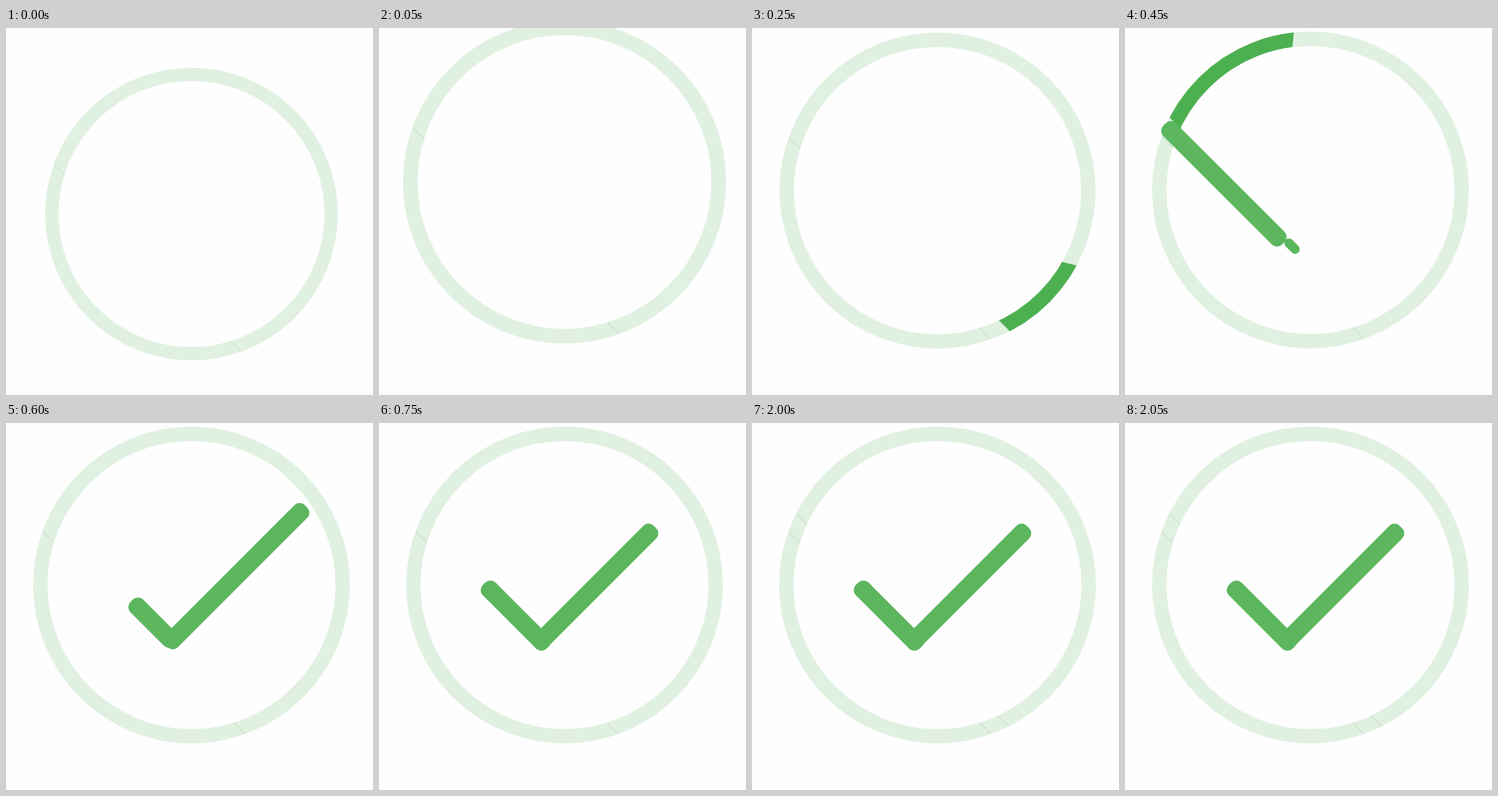
Recreate the animation shown at these times as an HTML page with a canvas. Size 367 px wide and 367 px high, loop 2450 ms.

```html
<!DOCTYPE html>
<html lang="en">
<head>
<meta charset="utf-8">
<title>Success</title>
<style>
  html, body { margin: 0; width: 100%; height: 100%; overflow: hidden; background: #fefefe; }
  canvas { display: block; width: 367px; height: 367px; }
</style>
</head>
<body>
<canvas id="stage" width="367" height="367"></canvas>
<script>
const ctx = document.getElementById('stage').getContext('2d');
const LOOP = 2450, STEP = 50, UNIT = 3.6, QUARTER = Math.PI / 4;

// Cubic Bezier easing, solved for x by bisection
const bezier = (x1, y1, x2, y2) => x => {
  const at = (s, a, b) => 3 * s * (1 - s) ** 2 * a + 3 * s * s * (1 - s) * b + s ** 3;
  let lo = 0, hi = 1;
  for (let i = 0; i < 24; i++) {
    const mid = (lo + hi) / 2;
    if (at(mid, x1, x2) < x) lo = mid; else hi = mid;
  }
  return at(lo, y1, y2);
};
const ease = bezier(.25, .1, .25, 1);
const easeIn = bezier(.42, 0, 1, 1);
const linear = x => x;

// Keys are [ms, ...values]; returns the values at time t
function tween(keys, t, easing) {
  if (t <= keys[0][0]) return keys[0].slice(1);
  const i = keys.findIndex(k => k[0] > t);
  if (i < 0) return keys[keys.length - 1].slice(1);
  const [a, b] = [keys[i - 1], keys[i]];
  const p = easing((t - a[0]) / (b[0] - a[0]));
  return a.slice(1).map((v, j) => v + (b[j + 1] - v) * p);
}

// Pop-in: scale, centre y
const pop = [[0, .924, 186], [50, 1.02, 154], [100, 1.048, 144.5],
             [150, .978, 170.5], [200, .951, 180.5], [250, .998, 162.6], [300, 1, 162]];
// Bars: width, left or right inset, top, inside an 80-unit box
const tip = [[395, 0, 1, 19], [525, 50, -8, 37], [630, 17, 21, 48], [750, 25, 14, 46]];
const long = [[474, 0, 46, 54], [630, 55, 0, 35], [750, 47, 8, 38]];

function ring(color) {
  ctx.beginPath();
  ctx.arc(0, 0, 42, 0, 2 * Math.PI);
  ctx.lineWidth = 4;
  ctx.strokeStyle = color;
  ctx.stroke();
}

function clipHalf(side) {
  ctx.beginPath();
  ctx.rect(side < 0 ? -200 : 0, -200, 200, 400);
  ctx.clip();
}

// Dark ring uncovered while a half disc spins once about its off-centre pivot
function sweep(t) {
  const p = (t - 212.5) / 297.5;
  if (p <= 0 || p >= 1) return;
  const turn = 2 * Math.PI * easeIn(p);
  ctx.save();
  ctx.translate(-10, 9);
  ctx.rotate(-QUARTER);
  clipHalf(1);
  ctx.rotate(-turn);
  clipHalf(-1);
  ctx.rotate(turn + QUARTER);
  ctx.translate(10, -9);
  ring('#4caf50');
  ctx.restore();
}

// Faint diagonal seam across the ring where y - x = d
function seam(d) {
  ctx.save();
  ctx.beginPath();
  ctx.arc(0, 0, 44, 0, 2 * Math.PI);
  ctx.arc(0, 0, 40, 0, 2 * Math.PI, true);
  ctx.clip();
  ctx.beginPath();
  ctx.moveTo(-60, d - 60);
  ctx.lineTo(60, d + 60);
  ctx.lineWidth = .25;
  ctx.strokeStyle = 'rgba(76, 150, 80, .22)';
  ctx.stroke();
  ctx.restore();
}

function bar(w, left, top, angle) {
  if (w <= 0) return;
  ctx.save();
  ctx.translate(left + w / 2 - 40, top - 37.5);
  ctx.rotate(angle);
  ctx.beginPath();
  ctx.roundRect(-w / 2, -2.5, w, 5, Math.min(2, w / 2));
  ctx.fillStyle = '#5cb65e';
  ctx.fill();
  ctx.restore();
}

function draw(t) {
  const [scale, cy] = tween(pop, t, linear);
  const late = t + 34;
  ctx.setTransform(1, 0, 0, 1, 0, 0);
  ctx.fillStyle = '#fefefe';
  ctx.fillRect(0, 0, 367, 367);
  ctx.translate(185.5, cy);
  ctx.scale(scale * UNIT, scale * UNIT);

  ring('#e0f0e1');
  seam(26.5);
  if (t >= 1000) seam(19.5);
  sweep(late);

  const [tw, tl, tt] = tween(tip, late, ease);
  bar(tw, tl, tt, QUARTER);
  const [lw, lr, lt] = tween(long, late, ease);
  bar(lw, 80 - lr - lw, lt, -QUARTER);
}

const start = performance.now();
function tick() {
  const t = (performance.now() - start) % LOOP;
  draw(Math.floor(t / STEP) * STEP);
  requestAnimationFrame(tick);
}
tick();
</script>
</body>
</html>
```
